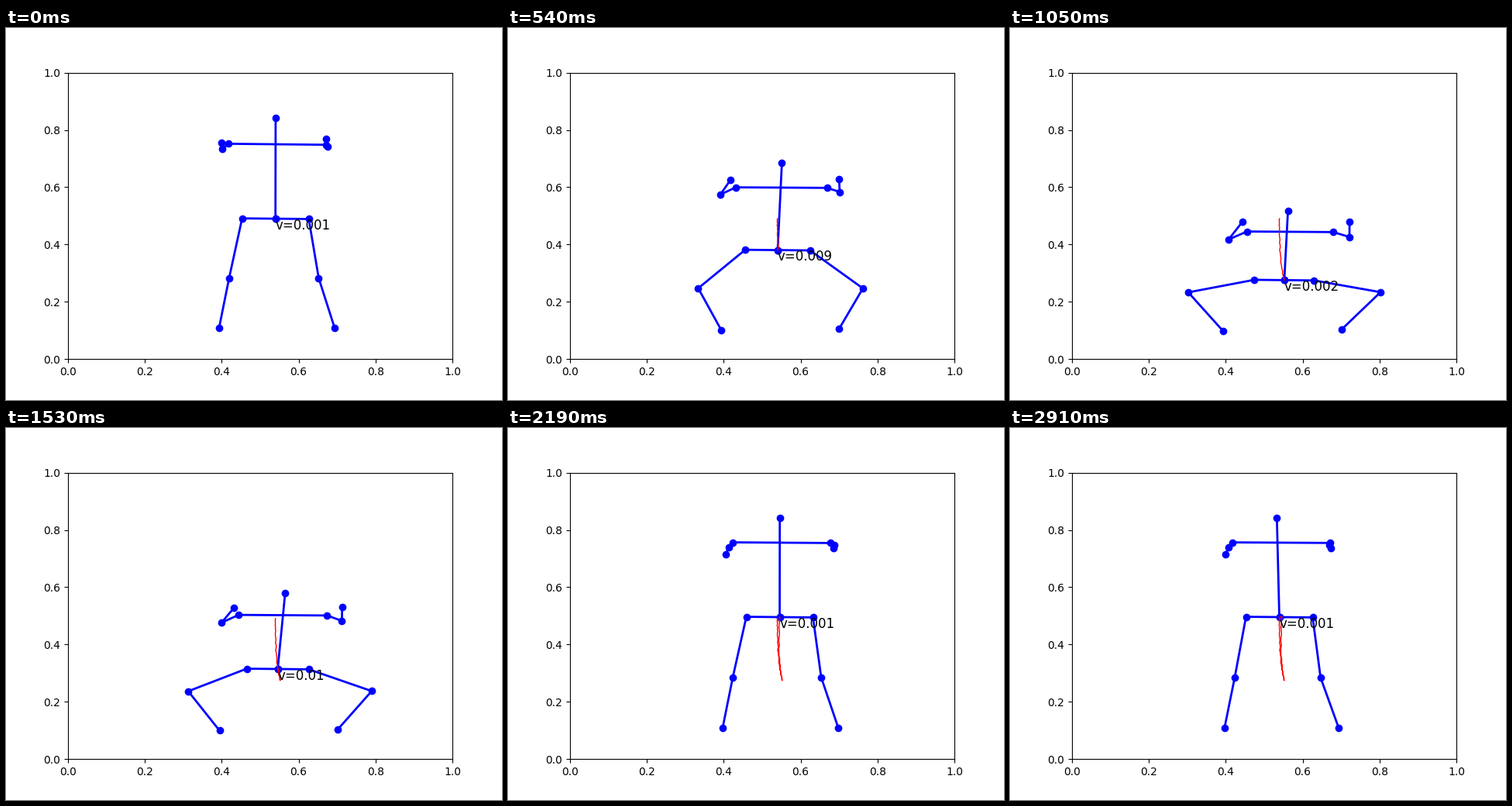
Animation, 640 px wide and 480 px high, one loop 2940 ms. Source, as a matplotlib script:

```python
import numpy as np
import matplotlib.pyplot as plt
from matplotlib.animation import FuncAnimation

FRAMES, INTERVAL = 98, 30
t = np.arange(FRAMES)
rng = np.random.default_rng(4)


def ease(start, end):
    u = np.clip((t - start) / (end - start), 0, 1)
    return u * u * (3 - 2 * u)


# One squat: down, a short hold, back up, then a slow sideways sway.
rise = ease(44, 70)
depth = ease(-0.5, 36) - rise
bend = depth ** 0.45
pace = np.abs(np.gradient(depth)) / 0.04
sway = 3 * np.sin(np.pi * np.clip((t - 50) / 47, 0, 1))


def mix(stand, squat, power=1):
    return stand + (squat - stand) * depth ** power


def jitter(amount=0.25):
    return amount * rng.uniform(-1, 1, FRAMES)


def joint(x, y):
    """Stage pixels (y down) to axes coordinates."""
    return np.array([(x - 80) / 496, (427.2 - y) / 369.6])


def shaky(x, y):
    return joint(x + jitter(), y + jitter())


# Torso
hx = mix(347.5, 353.8, 3) + sway + jitter(0.15 + 0.45 * pace)
hy = mix(246, 325.5) - 2 * rise
half = mix(43, 38.5, 2)
hip = joint(hx, hy)
hip_l, hip_r = joint(hx - half, hy - 0.4), joint(hx + half, hy + 0.4)

lean = depth * (4 + 7 * pace) + sway - 3 * rise
head = shaky(hx + lean, mix(116, 236.5, 1.08))

# Arms hang from the shoulders and open outwards with the bend.
sy = mix(150, 263, 1.05) - 2 * rise
lx, rx = hx + mix(-60.5, -48), hx + mix(65.5, 63)
sh_l, sh_r = shaky(lx, sy - 0.4), shaky(rx, sy + 0.4)
el_l = shaky(lx - 8 - 16 * bend + 3 * rise, sy + 6 + 4 * bend)
wr_l = shaky(lx - 9 + 3 * bend, sy - 1 - 12 * bend + 16 * rise)
el_r = shaky(rx + 1 + 20 * bend + sway, sy + 3 + 4 * bend + 4 * rise)
wr_r = shaky(rx - 1 + 22 * bend + 2 * sway, sy - 7 - 6 * bend + 10 * rise)

# Legs
ky = 322 + 19 * bend
knee_l = shaky(290 - 60 * bend, ky)
knee_r = shaky(401 + 77 * bend + sway, ky)
foot_l = shaky(275 + 2 * rise, 387 + 4 * bend)
foot_r = shaky(424 + 4 * bend + 0.7 * sway, 387 + 2 * bend)

CHAINS = [np.stack(c) for c in (
    [head, hip],
    [wr_l, el_l, sh_l, sh_r, el_r, wr_r],
    [foot_l, knee_l, hip_l, hip, hip_r, knee_r, foot_r],
)]
speed = np.hypot(*np.diff(hip, axis=1, prepend=hip[:, :1]))

fig, ax = plt.subplots(figsize=(6.4, 4.8), dpi=100)
fig.subplots_adjust(left=0.125, right=0.9, bottom=0.11, top=0.88)
ax.set(xlim=(0, 1), ylim=(0, 1))
bones = [ax.plot([], [], "bo-", lw=2, ms=6)[0] for _ in CHAINS]
trail, = ax.plot([], [], "r-", lw=1)
label = ax.text(0, 0, "", fontsize=12)


def draw(i):
    for line, chain in zip(bones, CHAINS):
        line.set_data(chain[:, 0, i], chain[:, 1, i])
    trail.set_data(hip[0, :i + 1], hip[1, :i + 1])
    label.set_position((hip[0, i], hip[1, i] - 0.037))
    label.set_text(f"v={max(round(float(speed[i]), 3), 0.001)}")
    return [*bones, trail, label]


anim = FuncAnimation(fig, draw, frames=FRAMES, interval=INTERVAL,
                     repeat=True, repeat_delay=0, blit=False)
plt.show()
```
